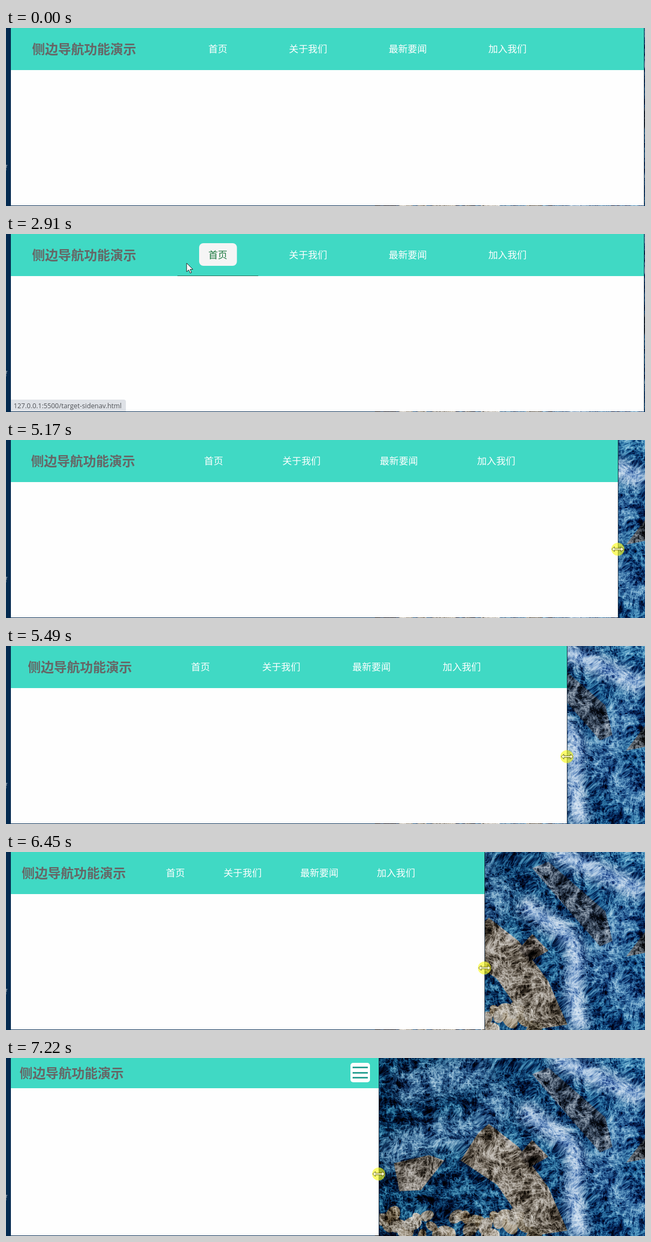
An HTML page with a canvas for the animation above (8000 ms loop, 1178 by 330 pixels).

```html
<!DOCTYPE html>
<html lang="zh">
<head>
<meta charset="utf-8">
<style>
  html, body { margin: 0; width: 100%; height: 100%; overflow: hidden; }
  canvas { display: block; }
</style>
</head>
<body>
<canvas id="stage" width="1178" height="330"></canvas>
<script>
const WIDTH = 1178, HEIGHT = 330, LOOP = 8000, TICK = 78.57, LEFT = 9;
const TEAL = '#40d9c4';
const CJK = '"Noto Sans CJK SC", "Noto Sans CJK", sans-serif';
const TITLE = '侧边导航功能演示';
const LABELS = ['首页', '关于我们', '最新要闻', '加入我们'];
const ctx = document.getElementById('stage').getContext('2d');

const ARROW = new Path2D('M0 0V16L4 12.5 6.5 18.5 9 17.5 6.5 11.5H11.5Z');
const HAND = new Path2D('M-1.5 12V1.5Q-1.5 0 0 0Q1.5 0 1.5 1.5V8Q3 6.5 4.5 8.3Q6.5 7.2 7.5 9Q9.5 8.4 10 10.5V16Q10 19 8 21V23H0Q-3 19-6 14Q-6.5 12-4.5 12Q-3 12-1.5 15Z');
const RESIZE = new Path2D('M-11 0L-6-4.5V-1.5H6V-4.5L11 0 6 4.5V1.5H-6V4.5Z');

const mix = (a, b, k) => a + (b - a) * k;
const ramp = (t, from, to) => Math.min(1, Math.max(0, (t - from) / (to - from)));
const smooth = k => k * k * (3 - 2 * k);

// The screen refreshes in even ticks
const snap = t => 70 + TICK * Math.floor((t - 70) / TICK + .25);

// Eased moves, each [from ms, to ms, x, y]
const follow = (t, start, ...moves) => moves.reduce((p, [from, to, x, y]) => {
  const k = smooth(ramp(t, from, to));
  return [mix(p[0], x, k), mix(p[1], y, k)];
}, start);

const pointerAt = t => follow(t, [1174, 300],
  [0, 560, 1160, 201], [900, 1240, 922, 31], [1410, 2500, 384, 52],
  [2660, 2890, 333, 54], [2910, 3640, 1130, 200]);

const edgeAt = t => follow(t, [1176, 201],
  [4860, 5870, 969, 207], [5870, 6450, 882, 215], [6450, 7140, 687, 215]);

function noise(x, y) {
  const hash = (i, j) => {
    const h = Math.sin(i * 127.1 + j * 311.7) * 43758.5453;
    return h - Math.floor(h);
  };
  const i = Math.floor(x), j = Math.floor(y);
  const u = smooth(x - i), v = smooth(y - j);
  return mix(mix(hash(i, j), hash(i + 1, j), u), mix(hash(i, j + 1), hash(i + 1, j + 1), u), v);
}

// Soft sea, foam and flat rocks, then veined by ridged noise
function makeWallpaper() {
  const canvas = document.createElement('canvas');
  canvas.width = WIDTH;
  canvas.height = HEIGHT;
  const c = canvas.getContext('2d');
  const sea = c.createLinearGradient(600, 0, WIDTH, 0);
  sea.addColorStop(0, '#02294f');
  sea.addColorStop(1, '#1c5c92');
  c.fillStyle = sea;
  c.fillRect(0, 0, WIDTH, HEIGHT);

  const foam = (color, width, path) => {
    c.filter = `blur(${width / 4}px)`;
    c.strokeStyle = color;
    c.lineWidth = width;
    c.stroke(new Path2D(path));
    c.filter = 'none';
  };
  const rock = (color, path) => {
    c.fillStyle = color;
    c.fill(new Path2D(path));
  };
  foam('rgba(110,160,205,.55)', 50, 'M700 190Q790 120 870 140L920 60M720 60L890 20M1150 100L1090 220 1178 290');
  rock('#46566a', 'M970 30L1000 18 1105 110 1118 165 1095 175 1030 100Z');
  foam('rgba(185,208,235,.9)', 34, 'M950 95L1000 130Q1060 160 1050 210T1060 330M1010 0L1178 75');
  rock('#857d72', 'M838 190L870 140 890 122 945 165 1000 240 1035 320 970 330 905 235Z');
  rock('#736c66', 'M890 122L932 158 943 182 970 152 1000 183 965 203Z');
  rock('#777169', 'M715 195L780 180 808 190 765 245 725 247Z');
  rock('#505861', 'M1143 194L1178 148V187Z');
  for (let i = 0; i < 32; i++) {
    const x = 695 + i * 9, size = 9 + 9 * noise(i * 3, 1);
    c.fillStyle = `hsl(38 ${8 + i % 3 * 3}% ${42 + 18 * noise(i * 7, 5)}%)`;
    c.beginPath();
    c.ellipse(x, 290 + 40 * noise(i * 5, 9), size, size * .7, i, 0, 7);
    c.fill();
  }

  const left = 680, image = c.getImageData(left, 0, WIDTH - left, HEIGHT), { data, width } = image;
  for (let p = 0; p < data.length; p += 4) {
    const x = (p / 4) % width, y = Math.floor(p / 4 / width);
    const bend = 20 * noise(x / 30, y / 30);
    let vein = 0;
    for (let scale = 36; scale > 2; scale /= 2) {
      vein += Math.abs(2 * noise((x + bend) / scale, (y - bend) / scale + scale) - 1) / 5;
    }
    const gamma = Math.exp((vein - .34) * 5);
    for (let k = p; k < p + 3; k++) data[k] = 255 * (data[k] / 255) ** gamma;
  }
  c.putImageData(image, left, 0);
  return canvas;
}
const wallpaper = makeWallpaper();

function text(string, x, y, font, color) {
  ctx.font = font;
  ctx.fillStyle = color;
  ctx.fillText(string, x, y);
}

function box(x, y, w, h, radius, color) {
  ctx.fillStyle = color;
  ctx.beginPath();
  ctx.roundRect(x, y, w, h, radius);
  ctx.fill();
}

function cursor(path, [x, y], fill, stroke) {
  ctx.save();
  ctx.translate(x, y);
  ctx.fillStyle = fill;
  ctx.strokeStyle = stroke;
  ctx.fill(path);
  ctx.stroke(path);
  ctx.restore();
}

// Draws the wide header; returns true when the pointer is on a link
function drawNav(pageWidth, pointer) {
  const shrink = pageWidth - 1167, size = 17.6, gap = 113.4 + .147 * shrink;
  let x = 373 + .272 * shrink, onLink = false;
  text(TITLE, 48 + .0663 * shrink, 47.5, `bold 24px ${CJK}`, '#666');
  for (const label of LABELS) {
    const w = label.length * size, tab = x - gap / 2;
    const hovered = pointer && pointer[1] < 78 && pointer[0] >= tab && pointer[0] < tab + w + gap;
    if (hovered) {
      box(x - 17, 17, w + 34.5, 42, 8, '#f5f5f5');
      box(Math.round(tab), 77, Math.round(w + gap), 1, 0, '#1f6e5a');
      onLink = Math.abs(pointer[0] - x - w / 2) < w / 2 + 17 && pointer[1] < 59;
    }
    text(label, x, 45, `${size}px ${CJK}`, hovered ? '#1d7a40' : '#fff');
    x += w + gap;
  }
  return onLink;
}

function drawMenuHeader(edge) {
  text(TITLE, 25, 36.5, `bold 24px ${CJK}`, '#666');
  box(edge - 52, 9, 36, 36, 5, '#fff');
  for (let i = 0; i < 3; i++) box(edge - 48, Math.round(16 + 9.6 * i), 28, 3, 0, '#2ba193');
}

function draw(now) {
  const t = snap(now % LOOP);
  const handle = edgeAt(t), edge = Math.round(handle[0]);
  const layoutEdge = Math.round(edgeAt(t - TICK)[0]); // page layout trails the window by one tick
  const pageWidth = layoutEdge - LEFT, narrow = pageWidth <= 768;
  const pointer = t >= 70 && t < 3600 ? pointerAt(t) : null;

  ctx.drawImage(wallpaper, 0, 0);
  text('f', -2, 264, '12px "Open Sans", sans-serif', '#eee');
  box(edge, 0, 1, HEIGHT, 0, '#14283c');
  box(LEFT, 0, edge - LEFT, 329, 0, '#fefefe');
  box(LEFT, 0, edge - LEFT, narrow ? 56 : 78, 0, TEAL);
  const onLink = narrow ? drawMenuHeader(layoutEdge) : drawNav(pageWidth, pointer);

  ctx.globalAlpha = ramp(t, 1340, 1560) - ramp(t, 3040, 3200);
  box(LEFT, 307, 212, 22, [0, 4, 0, 0], '#dee1e6');
  text('127.0.0.1:5500/target-sidenav.html', 14, 323, '12.3px "Open Sans", sans-serif', '#505357');
  ctx.globalAlpha = 1;

  if (pointer) cursor(onLink ? HAND : ARROW, pointer, '#fff', '#222');
  if (t >= 4300) {
    if (t >= 4780) box(edge - 12, handle[1] - 12, 24, 24, 12, 'rgba(248,248,20,.62)');
    cursor(RESIZE, handle, '#ffffd0', '#6b6a20');
  }
  requestAnimationFrame(draw);
}
requestAnimationFrame(draw);
</script>
</body>
</html>
```
